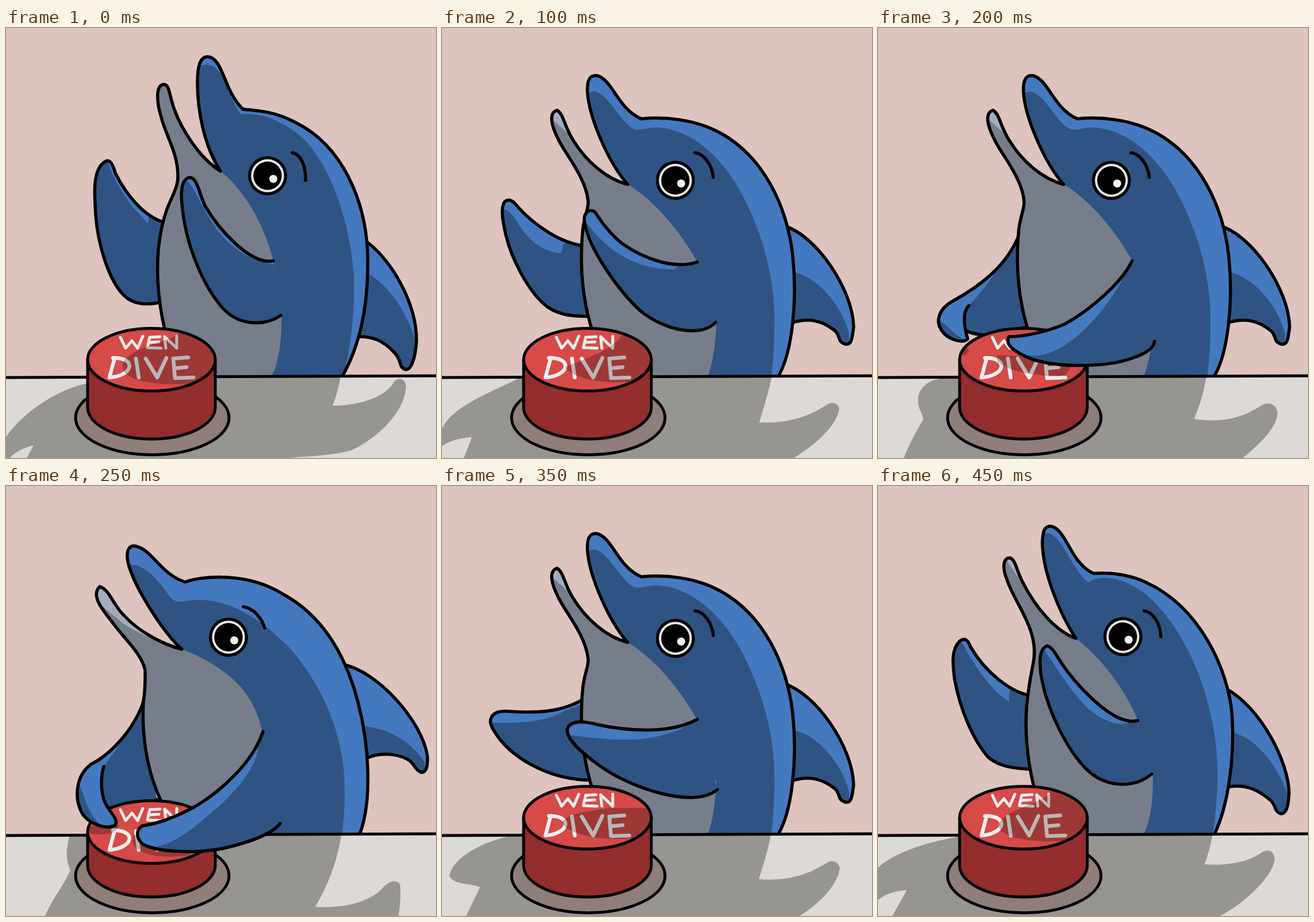
Recreate the animation shown at these times as an HTML page with a canvas. Size 748x748 px, loop 0.5 s.

```html
<!DOCTYPE html>
<html lang="en">
<head>
<meta charset="utf-8">
<title>Wen dive</title>
<style>
html, body { margin: 0; height: 100%; overflow: hidden; background: #dec4bf; }
canvas { display: block; width: 100vw; height: 100vh; }
</style>
</head>
<body>
<canvas id="stage" width="748" height="748"></canvas>
<script>
const ctx = document.getElementById('stage').getContext('2d');
const DARK = '#2f5483', LIGHT = '#4579bf', BELLY = '#787d8b', PALE = '#a4abc1';
const STEP = 50;

// Each limb is [outline, shaded part]. Body: top runs mouth to back, front runs belly to mouth.
const raised = {
  mouth: '373 249',
  top: 'C345 205 333 145 333 95C333 65 338 50 351 50C378 52 378 108 412 141C425 144 460 141 505 165C585 205 625 300 629 390C631 460 622 540 586 604',
  front: '310 620C262 520 250 400 280 315C292 285 300 275 299 255C298 215 277 185 270 155C262 130 260 100 274 98C285 98 283 115 293 142C305 175 335 225 373 249',
  edge: 'C415 282 448 340 465 404L440 450L479 500C480 540 475 580 463 604',
  shade: 'M0 75L338 66C358 58 370 72 381 92C390 115 398 138 409 150C447 147 482 162 518 193C567 242 600 345 605 430C607 510 598 560 584 620L0 620Z',
  jaw: '',
  fin: ['M622 368C670 400 715 480 714 545C712 575 705 595 695 594C682 590 690 580 676 565C655 542 635 536 612 537',
    'M620 422C660 440 698 490 714 550L710 600L600 600Z'],
  far: ['M275 338C238 327 208 288 190 252C184 230 178 228 170 234C150 250 154 290 156 325C160 380 180 440 205 465C222 482 245 482 270 477',
    'M140 225L178 236C190 270 215 310 248 340V325L290 330V500H140Z'],
  near: ['M465 405C425 413 370 350 346 309C336 288 333 261 320 260C305 262 304 285 306 305C312 380 345 450 375 485C400 515 445 522 478 500',
    'M290 258L316 266C335 290 350 335 380 366C400 387 430 406 465 411L490 500L420 540H290Z'],
  eye: [455, 257],
  brow: 'M498 217C515 220 522 245 521 265',
  cast: 'M142 600L142 618C80 630 20 680 0 712V748H7C15 738 30 730 48 726L36 748H490C520 745 560 745 600 735C650 712 695 665 696 622C692 606 678 608 673 619C655 645 610 657 568 657C575 640 579 625 583 600Z',
  topCast: 'M303 530C290 545 203 558 203 588C203 615 260 622 320 619L375 600V530Z'
};

const leaning = {
  mouth: '344 265',
  top: 'C315 220 287 150 286 100C286 75 292 69 301 70C328 75 335 135 375 152C390 151 425 149 465 167C560 210 610 320 616 400C621 480 607 560 586 604',
  front: '310 620C262 540 250 430 262 355C266 320 275 300 271 275C266 235 235 195 225 165C215 140 218 125 230 125C240 130 240 145 252 168C274 211 309 253 344 265',
  edge: 'C390 300 430 355 452 407L430 450L478 502C479 540 475 580 463 604',
  shade: 'M0 82L290 82C318 76 335 145 367 168C385 152 430 160 465 188C515 228 560 310 578 395C594 460 595 530 580 620L0 620Z',
  jaw: 'M215 122H245L243 158L226 133Z',
  fin: ['M606 353C665 385 715 480 715 535C714 560 709 571 700 570C688 565 694 557 682 546C660 528 640 519 612 523',
    'M612 428C655 434 695 485 714 540L712 590L600 590Z'],
  far: ['M268 365C231 360 187 324 161 280C156 266 150 264 142 270C127 285 130 310 133 335C143 390 165 440 190 470C210 490 245 492 272 493',
    'M120 266L146 272C165 308 195 355 228 375V355L290 360V510H120Z'],
  near: ['M452 408C415 418 360 362 329 322C312 300 305 280 294 278C280 284 281 305 283 325C293 390 330 460 362 492C395 525 445 527 476 501',
    'M270 276L290 286C310 315 330 350 365 387C390 408 415 417 432 413L460 405L490 500L420 540H270Z'],
  eye: [426, 262],
  brow: 'M463 217C480 220 491 240 492 262',
  cast: 'M136 600V611C80 620 25 640 0 664V720C15 708 30 705 50 703C42 718 33 733 25 748H595C640 725 690 675 690 648C688 632 675 631 664 640C640 655 605 661 568 658C574 642 579 625 583 600Z',
  topCast: 'M301 530C290 555 211 562 211 592C213 612 270 622 325 617L375 600V530Z'
};

const middle = {
  mouth: '323 272',
  top: 'C290 235 255 155 253 110C252 86 260 82 270 83C297 90 305 140 347 158C385 154 440 158 485 183C560 225 600 310 610 395C619 480 608 565 586 604',
  front: '310 620C255 550 235 450 245 350C248 325 256 312 254 300C250 260 215 220 203 195C190 170 185 148 200 143C212 150 212 170 228 195C250 231 286 263 323 272',
  edge: 'C370 300 415 355 443 405L420 460L477 514C476 545 472 580 463 604',
  shade: 'M0 115L254 115C275 95 300 145 323 168C340 185 350 172 375 173C440 176 495 235 525 295C555 355 575 420 578 490C579 540 577 580 571 620L0 620Z',
  jaw: 'M180 138H215L218 182L192 159Z',
  fin: ['M592 343C650 358 715 455 716 520C713 546 711 551 702 550C687 546 694 537 684 527C662 509 638 503 608 513',
    'M608 424C650 430 695 480 708 532L708 560L600 560Z'],
  eye: [406, 265],
  brow: 'M440 217C455 218 470 238 472 260'
};

const armsUp = {
  ...middle,
  far: ['M250 379C208 376 160 343 130 309C122 299 116 297 109 302C100 315 108 345 111 360C122 405 150 455 175 478C195 498 225 503 262 501',
    'M95 318L110 316C130 318 140 385 207 392L212 374L270 376V520H95Z'],
  near: ['M444 407C400 422 345 397 315 376C290 357 274 332 266 320C256 313 245 322 248 338C255 385 310 460 345 492C385 525 450 540 476 512',
    'M235 342L252 340C270 362 315 421 405 420L412 413L450 405L490 510L440 550H235Z'],
  cast: 'M132 600V610C95 630 20 655 0 697V727C15 718 30 713 52 712L38 748H612C650 725 688 690 691 662C688 650 675 650 667 657C630 680 595 688 552 686C563 650 569 630 575 600Z',
  topCast: 'M316 530C300 560 250 575 215 590C225 608 280 622 335 614L375 600V530Z'
};

const armsLevel = {
  ...middle,
  far: ['M250 368C210 395 160 395 115 392C85 390 78 407 90 425C115 468 180 512 264 512',
    'M75 412C120 412 175 415 215 390L270 370V530H75Z'],
  near: ['M444 406C400 430 330 428 270 415C245 408 222 408 218 423C216 440 240 462 275 487C330 527 440 562 479 528',
    'M200 432C260 435 340 455 412 424L450 405L490 525L440 565H200Z'],
  cast: 'M118 600V609C60 622 18 650 13 678C20 695 50 690 66 698L42 748H622C660 725 690 690 692 664C688 650 675 650 667 657C630 680 595 687 551 684C562 650 568 630 573 600Z',
  topCast: 'M290 560C260 565 215 570 210 585C215 605 280 620 335 612L375 600V560Z'
};

const armsDown = {
  ...middle,
  edge: 'C370 300 415 355 442 405L430 480L475 556C471 580 467 592 463 604',
  far: ['M247 356C225 415 175 450 132 474L140 520L158 529C175 534 190 537 210 528L264 520',
    'M246 366C205 425 185 455 158 483C148 500 150 520 156 540H270V366Z'],
  hand: ['M132 474C105 488 100 510 110 525C120 542 148 550 156 541C150 520 146 495 158 483',
    'M100 510C118 508 124 530 155 545L140 560L100 550Z'],
  near: ['M442 405C425 442 370 490 325 515C290 530 250 537 228 537C218 553 245 567 270 577C325 593 405 588 440 575C462 568 480 558 481 545',
    'M421 445C395 492 345 545 310 560C285 573 255 574 236 560L240 610H490V400L442 400Z'],
  cast: 'M106 600V611C85 613 66 630 70 655C73 668 80 675 78 682C65 705 55 722 45 748H635C665 722 695 695 695 668C690 650 675 650 665 658C630 680 595 687 550 680C562 650 568 630 572 600Z',
  topCast: 'M207 569C200 590 260 607 325 605L345 575ZM145 556C160 550 162 568 147 570Z'
};

const pressed = {
  mouth: '306 284',
  top: 'C275 258 215 165 211 125C210 108 217 102 227 105C255 112 268 152 311 167C345 156 420 150 480 187C560 230 595 310 612 375C632 450 637 545 616 604',
  front: '320 620C250 550 235 450 239 375C243 350 242 335 242 320C235 290 205 265 185 237C165 212 148 190 163 175C180 180 185 205 205 225C230 252 270 275 306 284',
  edge: 'C350 300 395 330 415 358C435 385 442 410 446 428L430 500L455 604',
  shade: 'M0 137L212 137C245 134 268 170 285 192C295 206 310 200 330 198C390 196 440 230 490 278C555 350 588 440 589 520C590 560 587 590 582 620L0 620Z',
  jaw: 'M140 170H185L215 225L300 283C265 272 220 252 200 236C185 224 170 210 155 200Z',
  fin: ['M584 310C645 320 725 410 733 470C734 490 730 499 722 498C709 492 712 483 698 475C675 464 648 464 626 474',
    'M615 417C665 420 705 445 728 480L730 510H610Z'],
  far: ['M240 372C225 420 185 465 148 484L150 560H275L262 545',
    'M238 382C215 430 190 460 170 488C163 520 165 550 178 575H280V382Z'],
  hand: ['M148 484C120 505 118 545 134 572C150 592 178 597 190 590C197 580 180 568 172 550C164 530 165 505 170 488',
    'M115 510C138 512 130 562 168 592L150 605L115 580Z'],
  near: ['M447 427C430 480 375 530 330 557C295 576 262 588 237 591C224 600 228 615 238 623C265 638 330 639 375 631C420 621 462 606 477 587',
    'M438 450C440 480 410 520 375 553C330 590 300 625 240 632L250 650H490V425L447 420Z'],
  eye: [387, 263],
  brow: 'M413 210C430 212 445 230 450 247',
  cast: 'M110 600V612C105 628 103 650 112 668C98 700 82 715 68 748H683C685 728 688 710 685 692C677 684 667 688 658 696C635 725 585 735 538 732C560 695 578 650 584 600Z',
  topCast: 'M222 608C210 635 260 652 320 642L345 600ZM140 593L197 590C192 606 165 609 146 604Z',
  press: 25
};

const poses = [raised, leaning, armsUp, armsLevel, armsDown, pressed];
const order = [0, 1, 2, 3, 4, 5, 4, 3, 2, 1];

function fill(d, color) {
  ctx.fillStyle = color;
  ctx.fill(new Path2D(d));
}

function stroke(d, width = 5.5, color = '#000') {
  ctx.lineWidth = width;
  ctx.strokeStyle = color;
  ctx.stroke(new Path2D(d));
}

function within(d, draw) {
  ctx.save();
  ctx.clip(new Path2D(d));
  draw();
  ctx.restore();
}

function limb(part) {
  if (!part) return;
  const [line, shade] = part;
  within(line, () => {
    fill(line, LIGHT);
    fill(shade, DARK);
  });
  stroke(line);
}

function disc(x, y, r, color) {
  ctx.fillStyle = color;
  ctx.beginPath();
  ctx.arc(x, y, r, 0, 7);
  ctx.fill();
}

function drawBody(p) {
  const body = `M${p.mouth}${p.top}L586 620L${p.front}Z`;
  const belly = `M${p.front}${p.edge}V620Z`;
  within(body, () => {
    fill(body, LIGHT);
    fill(p.shade, DARK);
  });
  fill(belly, BELLY);
  if (p.jaw) within(belly, () => fill(p.jaw, PALE));
  stroke(body);
  const [x, y] = p.eye;
  disc(x, y, 34, '#000');
  disc(x, y, 28.7, '#ebebeb');
  disc(x, y, 24.7, '#000');
  disc(x + 10, y + 5.5, 7, '#f4f4f4');
  stroke(p.brow);
}

function drawTable(p) {
  const table = 'M0 608L748 605V748H0Z';
  fill(table, '#dcd9d6');
  within(table, () => fill(p.cast, '#979592'));
  stroke('M-5 608L753 605', 5);
}

function letter(color, drop) {
  ctx.save();
  ctx.translate(0, drop);
  stroke('M199 538L208 557L219 544L229 557L238 536M268 537L250 538L246 556L270 557M248 547L266 546M278 557L276 537L297 557V536', 5, color);
  stroke('M189 574L180 608C222 605 228 573 186 574M226 575L231 608M243 575L263 608L279 574M317 573L291 575L294 609L326 608M293 592L314 590', 6.5, color);
  ctx.restore();
}

function drawButton(p) {
  const drop = p.press || 0, y = 577 + drop;
  const plate = 'M121 678A133.5 64.5 0 0 1 388 678A133.5 64.5 0 0 1 121 678Z';
  const side = `M142 ${y}V660A111 55 0 0 0 364 660V${y}Z`;
  const lid = `M142 ${y}A111 54.5 0 0 1 364 ${y}A111 54.5 0 0 1 142 ${y}Z`;
  fill(plate, '#8f7e79');
  stroke(plate, 5);
  fill(side, '#932d2e');
  stroke(side, 5);
  fill(lid, '#d64a48');
  letter('#ececec', drop);
  within(lid, () => {
    fill(p.topCast, '#9d3837');
    within(p.topCast, () => letter('#bab6b5', drop));
  });
  stroke(lid, 5);
}

function draw(p) {
  ctx.fillStyle = '#dec4bf';
  ctx.fillRect(0, 0, 748, 748);
  limb(p.fin);
  limb(p.far);
  drawBody(p);
  drawTable(p);
  drawButton(p);
  limb(p.hand);
  limb(p.near);
}

ctx.lineCap = ctx.lineJoin = 'round';
function tick() {
  const step = Math.floor(performance.now() / STEP) % order.length;
  draw(poses[order[step]]);
  requestAnimationFrame(tick);
}
tick();
</script>
</body>
</html>
```
